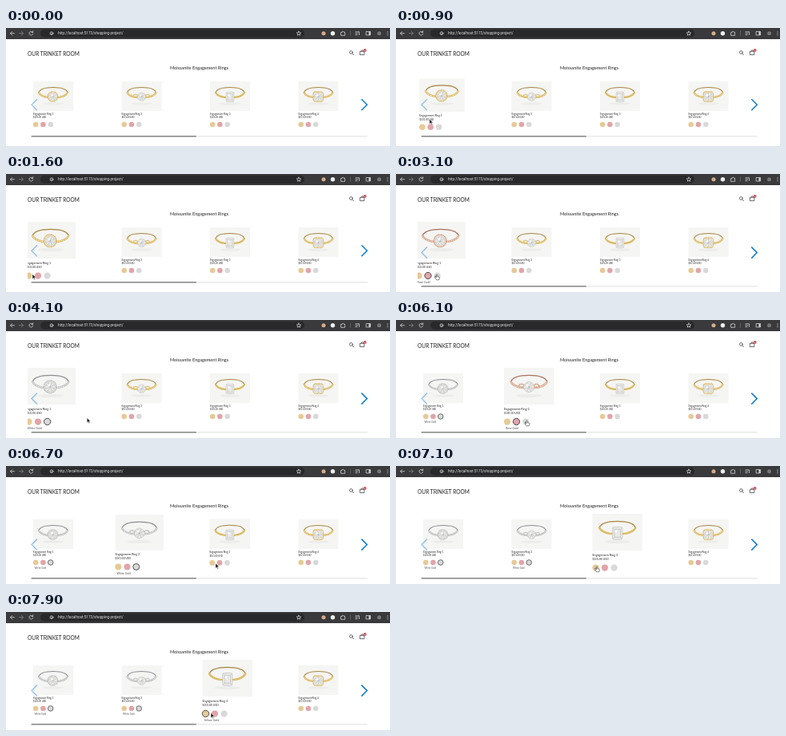
Animation, 480 px wide and 148 px high, one loop 8000 ms. Source, as an HTML page:

```html
<!DOCTYPE html>
<html lang="en">
<head>
<meta charset="utf-8">
<title>Ring carousel</title>
<style>
  html, body { margin: 0; width: 100%; height: 100%; overflow: hidden; background: #fff; }
  svg { display: block; width: 100vw; height: 100vh; }
  text { font-family: Lato, "Open Sans", sans-serif; fill: #222; }
  .line { fill: none; stroke: #d2d2d4; stroke-width: .8; stroke-linecap: round; stroke-linejoin: round; }
  .dark { stroke: #444; }
  .band { fill: none; stroke: var(--metal); stroke-linecap: round; }
  .shade { stroke: var(--shade); }
  .pave { fill: none; stroke: #fffdf6; stroke-width: .9; stroke-dasharray: .7 .7; }
  .halo { fill: #f6f3ec; stroke: var(--metal); stroke-width: 1.3; stroke-dasharray: 1 .35; }
  .stone { fill: #e9e9e7; stroke: #b5b3ae; stroke-width: .4; }
  .facet { fill: none; stroke: #a9a8a5; stroke-width: .35; }
  .glint { fill: #fff; }
  .picked { stroke: #4c4c4c; stroke-width: .8; }
  .chevron { fill: none; stroke: #127bd0; stroke-width: 1.5; }
</style>
</head>
<body>
<svg viewBox="0 0 480 148">
  <defs><clipPath id="view"><rect x="27" y="54" width="425" height="94"/></clipPath></defs>

  <rect width="480" height="14" fill="#3a3a3c"/>
  <rect x="43" y="1.8" width="330" height="10" rx="5" fill="#29292b"/>
  <g class="line">
    <path d="M10.5 6.7H5.5M7.7 4.5 5.5 6.7 7.7 8.9"/>
    <path stroke="#858587" d="M16.5 6.7h5M19.3 4.5l2.2 2.2-2.2 2.2"/>
    <path d="M33.4 5.3a2.4 2.4 0 1 0 .3 2.1M33.7 3.8v1.8h-1.8"/>
    <circle cx="57" cy="6.7" r="1.9"/><path d="M57 6.5v1"/>
    <path d="M366 4.1l.8 1.7 1.9.2-1.4 1.3.4 1.9-1.7-1-1.7 1 .4-1.9-1.4-1.3 1.9-.2z"/>
    <path d="M419 5.3h1.3a1 1 0 0 1 2 0h1.3v4H419z"/>
    <path stroke="#68686a" d="M430.5 4v5.5"/>
    <path d="M437 4.8h4M437 6.7h2.5M437 8.6h2M441.5 5v3.5"/>
    <rect x="450.5" y="4.5" width="5" height="4.4"/>
  </g>
  <path d="M453.5 4.5h2v4.4h-2z" fill="#d2d2d4"/>
  <circle cx="397" cy="6.8" r="2.5" fill="#d6ad8b"/>
  <circle cx="408.5" cy="6.8" r="2.7" fill="#ededed"/>
  <circle cx="466.5" cy="6.8" r="2.5" fill="#77777a"/>
  <g fill="#d2d2d4"><circle cx="477" cy="4.8" r=".6"/><circle cx="477" cy="6.8" r=".6"/><circle cx="477" cy="8.8" r=".6"/></g>
  <text x="65" y="8.4" font-size="4.65" style="fill:#e0e0e2;font-family:Roboto,sans-serif">http://localhost:5173/shopping-project/</text>

  <text x="27" y="35.3" font-size="6.6">OUR TRINKET ROOM</text>
  <text x="241.5" y="52" font-size="5.6" text-anchor="middle">Moissanite Engagement Rings</text>
  <g class="line dark">
    <circle cx="431.4" cy="30.5" r="1.9"/><path d="M432.9 32l1.6 1.7"/>
    <path d="M442.8 29.3h5v4.3h-5zM444 29.2a1.3 1.5 0 0 1 2.6 0"/>
  </g>
  <circle cx="448.6" cy="28" r="2" fill="#d4525e"/>
  <text x="448.6" y="28.9" font-size="2.5" text-anchor="middle" style="fill:#fff">0</text>

  <g id="cards" clip-path="url(#view)"></g>
  <g id="arrows">
    <path class="chevron" opacity=".4" d="M39 89.3 32 96.3 39 103.3"/>
    <path class="chevron" d="M444.3 89.3 451.3 96.3 444.3 103.3"/>
  </g>
  <g id="bar">
    <rect x="31.5" y="135.2" width="420.5" height="1.4" rx=".7" fill="#e5e5e5"/>
    <rect x="31.5" y="135.2" width="206.5" height="1.4" rx=".7" fill="#747474"/>
  </g>
  <path id="arrow" d="M0 0V6.2L1.5 4.9 2.5 7.1 3.5 6.6 2.5 4.5H4.4Z" fill="#111" stroke="#fff" stroke-width=".5"/>
  <path id="hand" d="M-.7 .5Q0-.5 .7 .5V2.7L3.2 3.3Q3.7 3.6 3.5 4.5L2.8 6.8H-.3L-2.3 4Q-2-.3-.7 4Z" fill="#fff" stroke="#222" stroke-width=".55"/>
</svg>
<script>
const LOOP = 8000, GROW = 400, PITCH = 110.5;
const PIVOT = { x: 38, y: 95 };
const swatchX = [3.2, 12.4, 21.7], swatchY = 121, swatchR = 3.3;
const golds = [
  { name: 'Yellow Gold', swatch: '#e6ca97', metal: '#d9b554', shade: '#a9853a' },
  { name: 'Rose Gold', swatch: '#e1a4a9', metal: '#d39c7c', shade: '#a87259' },
  { name: 'White Gold', swatch: '#d9d9d9', metal: '#bbbcbe', shade: '#8d8e91' }
];
// Hover interval and [time, swatch] clicks of each card
const cards = [
  { hover: [700, 4150], picks: [[1900, 0], [2600, 1], [3250, 2]] },
  { hover: [4180, 6600], picks: [[4900, 0], [5500, 1], [6250, 2]] },
  { hover: [6640, 9000], picks: [[7200, 0]] },
  { hover: [9000, 9000], picks: [] }
];
const cursorPath = [
  [100, 8, 152], [850, 42, 114], [1450, 33, 125], [1600, 33, 125.5], [1900, 30, 127],
  [2400, 40, 127], [2700, 40, 127], [3050, 51, 126], [3400, 51, 126], [3900, 82, 123],
  [4450, 146, 122], [4600, 146, 122.3], [4850, 140, 126], [5350, 151, 126], [5600, 151, 126],
  [6000, 163.5, 126], [6350, 163.5, 126], [6680, 262, 122], [7100, 251, 126], [7400, 251, 126],
  [7850, 256, 126.5], [8000, 256, 126.5]
];

const stones = [
  `<circle class="halo" cx="24.5" cy="19" r="6.2"/><circle class="stone" cx="24.5" cy="19" r="4.9"/>
   <path class="facet" d="M20 17l9 4M20 21l9-4M22.5 14.6l4 8.8M26.5 14.6l-4 8.8"/>`,
  `<ellipse class="halo" cx="17.5" cy="17.8" rx="2.5" ry="1.5"/><ellipse class="halo" cx="32.5" cy="17.8" rx="2.5" ry="1.5"/>
   <circle class="stone" cx="25" cy="19.2" r="5.2"/><path class="facet" d="M20.5 17l9 4.5M20.5 21.5l9-4.5M23 14.8l4 9M27 14.8l-4 9"/>`,
  `<rect class="stone" x="20" y="13.2" width="10" height="12.5" rx="1.6"/>
   <path class="facet" d="M22 15.4h6v8h-6zM20.5 14l1.5 1.4M29.5 14l-1.5 1.4M20.5 25l1.5-1.6M29.5 25l-1.5-1.6"/>`,
  `<rect class="halo" x="18.7" y="13" width="12.4" height="12.4" rx="3"/><rect class="stone" x="20.2" y="14.5" width="9.4" height="9.4" rx="2.4"/>
   <path class="facet" d="M21 16l8 6.5M21 22.5l8-6.5M25 14.6v9.2M20.4 19.2h9"/>`
];
const arms = 'M7 14Q10 20.3 25 20.3Q40 20.3 43 14';

const ringMarkup = i => `
  <rect width="50" height="37" fill="#f5f5f4"/>
  <ellipse cx="25" cy="28" rx="13" ry="1.6" fill="#ececea"/>
  <path class="band shade" stroke-width="1.1" d="M7 14Q9 7.5 25 7.5Q41 7.5 43 14"/>
  <path class="band" stroke-width="2.1" d="${arms}"/>
  <path class="pave" ${i === 2 ? 'opacity=".35"' : ''} d="${arms}"/>
  ${stones[i]}<circle class="glint" cx="23.5" cy="17.5" r="1.2"/>`;

const cardMarkup = (_, i) => `<g>
  <g transform="translate(0 67)">${ringMarkup(i)}</g>
  <text y="109" font-size="3">Engagement Ring ${i + 1}</text>
  <text y="113.4" font-size="2.7">$101.00 USD</text>
  ${golds.map((g, k) => `<circle class="swatch" cx="${swatchX[k]}" cy="${swatchY}" r="${swatchR}" fill="${g.swatch}"/>`).join('')}
  <text class="label" x="1.6" y="128.6" font-size="2.9" style="fill:#555"></text></g>`;

const $ = id => document.getElementById(id);
$('cards').innerHTML = cards.map(cardMarkup).join('');
cards.forEach((c, i) => {
  c.x = 34 + i * PITCH;
  c.el = $('cards').children[i];
  c.label = c.el.querySelector('.label');
  c.swatches = c.el.querySelectorAll('.swatch');
});

const ease = p => { p = Math.min(1, Math.max(0, p)); return p * p * (3 - 2 * p); };

function cursorAt(t) {
  const n = Math.max(1, cursorPath.findIndex(k => k[0] > t));
  const [t0, x0, y0] = cursorPath[n - 1], [t1, x1, y1] = cursorPath[n];
  const p = ease((t - t0) / (t1 - t0));
  return [x0 + (x1 - x0) * p, y0 + (y1 - y0) * p];
}

function draw(now) {
  const t = now % LOOP, [cx, cy] = cursorAt(t);
  let overSwatch = false, labelled = false;
  for (const c of cards) {
    const [enter, leave] = c.hover;
    const s = 1 + .25 * (ease((t - enter) / GROW) - ease((t - leave) / GROW));
    const dx = c.x + PIVOT.x * (1 - s), dy = PIVOT.y * (1 - s);
    const pick = c.picks.filter(p => p[0] <= t).pop();
    const gold = golds[pick ? pick[1] : 0];
    c.el.setAttribute('transform', `translate(${dx} ${dy}) scale(${s})`);
    c.el.style.setProperty('--metal', gold.metal);
    c.el.style.setProperty('--shade', gold.shade);
    c.label.textContent = pick ? gold.name : '';
    c.swatches.forEach((el, k) => {
      el.classList.toggle('picked', !!pick && pick[1] === k);
      const gap = Math.hypot(cx - dx - swatchX[k] * s, cy - dy - swatchY * s);
      if (gap < swatchR * s) overSwatch = true;
    });
    if (pick) labelled = true;
  }
  // A colour label makes the carousel taller
  $('bar').setAttribute('transform', `translate(0 ${labelled ? 5 : 0})`);
  $('arrows').setAttribute('transform', `translate(0 ${labelled ? 2.3 : 0})`);
  for (const id of ['arrow', 'hand']) {
    $(id).setAttribute('transform', `translate(${cx} ${cy})`);
    $(id).style.display = (id === 'hand') === overSwatch ? '' : 'none';
  }
}

let start;
function tick(now) {
  start ??= now;
  draw(now - start);
  requestAnimationFrame(tick);
}
draw(0);
requestAnimationFrame(tick);
</script>
</body>
</html>
```
